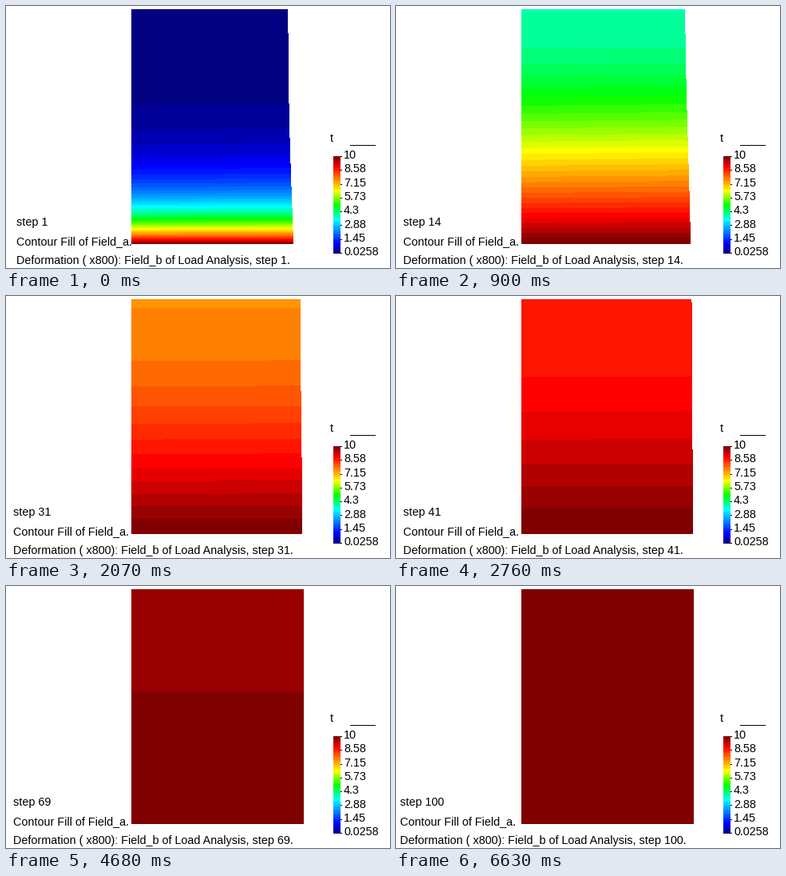
Recreate the animation shown at these times as a matplotlib script. Size 481 px wide and 328 px high, loop 7090 ms.

```python
import numpy as np
import matplotlib.pyplot as plt
from matplotlib.animation import FuncAnimation

W, H = 481, 328
DPI = 64
TICK = 10                      # ms per animation frame
LOOP = 7090

LEFT, TOP, ROWS, COLS = 157, 4, 294, 218
BANDS, BAND_WIDTH, BAND_OFFSET = 50, 0.1992, 0.052
DECAY = 0.05465                # first-mode rate of one implicit time step

plt.rcParams["font.family"] = "Liberation Sans"


def make_palette():
    """Rainbow from dark red to dark blue, symmetric about green."""
    side = np.arange(BANDS) - (BANDS - 1) / 2
    dist = np.abs(side)
    outer = np.clip(dist / 7.5, 0, 1) - 0.5 * np.clip((dist - 19.5) / 5, 0, 1)
    green = np.clip((19.5 - dist) / 12, 0, 1)
    rgb = np.stack([outer * (side < 0), green, outer * (side > 0)], axis=1)
    return np.round(255 * rgb).astype(np.uint8)


PALETTE = make_palette()
DEPTH = (np.arange(ROWS) + 0.5) / ROWS
KERNEL = np.exp(-0.5 * ((DEPTH[:, None] - DEPTH) / 0.28) ** 2)
KERNEL /= KERNEL.sum(axis=1, keepdims=True)


def deficit(step):
    """Degrees still missing to 10: slab heated from below, insulated on top."""
    n = np.arange(60)
    odd = 2 * n + 1
    amp = 40 / np.pi * (-1.0) ** n / odd / (1 + DECAY * odd**2) ** step
    return np.cos(np.outer(DEPTH, odd) * np.pi / 2) @ amp


def plate(step):
    missing = deficit(step)
    edge = np.floor(373.6 - 2 * (KERNEL @ missing)) - LEFT
    x = np.arange(COLS)
    tilt = 0.3 * (edge[-1] - edge[0])
    shift = tilt * np.outer(np.sin(np.pi * DEPTH), x / COLS)
    rows = np.arange(ROWS)
    field = np.interp(rows[:, None] + shift, rows, missing)
    band = np.floor((field - BAND_OFFSET) / BAND_WIDTH).astype(int)
    img = PALETTE[np.clip(band, 0, BANDS - 1)]
    img[x[None, :] >= edge[:, None]] = 255
    return img


# The playback speeds up slightly, then holds the final step.
steps = [*range(1, 98), 100]
starts = np.interp(np.arange(len(steps)), [0, 50, 68, 97],
                   [0, 3460, 4680, 6630]) // TICK
plates = [plate(s) for s in steps]

fig = plt.figure(figsize=(W / DPI, H / DPI), dpi=DPI, facecolor="white")


def label(x, y, text=""):
    return fig.text(x / W, 1 - y / H, text, fontsize=14.4 * 72 / DPI,
                    color="black", ha="left", va="baseline")


def picture(img, x, y):
    return fig.figimage(img, xo=x, yo=H - y - img.shape[0], origin="upper")


def rule(x, y, width):
    picture(np.zeros((1, width, 3), np.uint8), x, y)


def draw_legend():
    label(405.5, 170, "t")
    rule(431, 174, 32)
    height = 122
    band = np.arange(height) * BANDS // height
    picture(np.repeat(PALETTE[band][:, None], 9, axis=1), 410, 188)
    for i, value in enumerate(np.linspace(10, 0.0258, 8)):
        y = 188 + 17.3 * i
        rule(419, round(y), 2)
        label(423, round(y + 3), f"{value:.3g}")


draw_legend()
body = picture(plates[0], LEFT, TOP)
lines = [label(0, y) for y in (275, 299, 323)]


def update(frame):
    i = int(np.searchsorted(starts, frame, side="right")) - 1
    step = steps[i]
    body.set_data(plates[i])
    texts = (f"step {step}", "Contour Fill of Field_a.",
             f"Deformation ( x800): Field_b of Load Analysis, step {step}.")
    x = 17 - 4 * len(str(step))
    for line, text in zip(lines, texts):
        line.set_text(text)
        line.set_x(x / W)
    return [body, *lines]


anim = FuncAnimation(fig, update, frames=LOOP // TICK, interval=TICK,
                     repeat=True, repeat_delay=0, blit=False)
plt.show()
```
